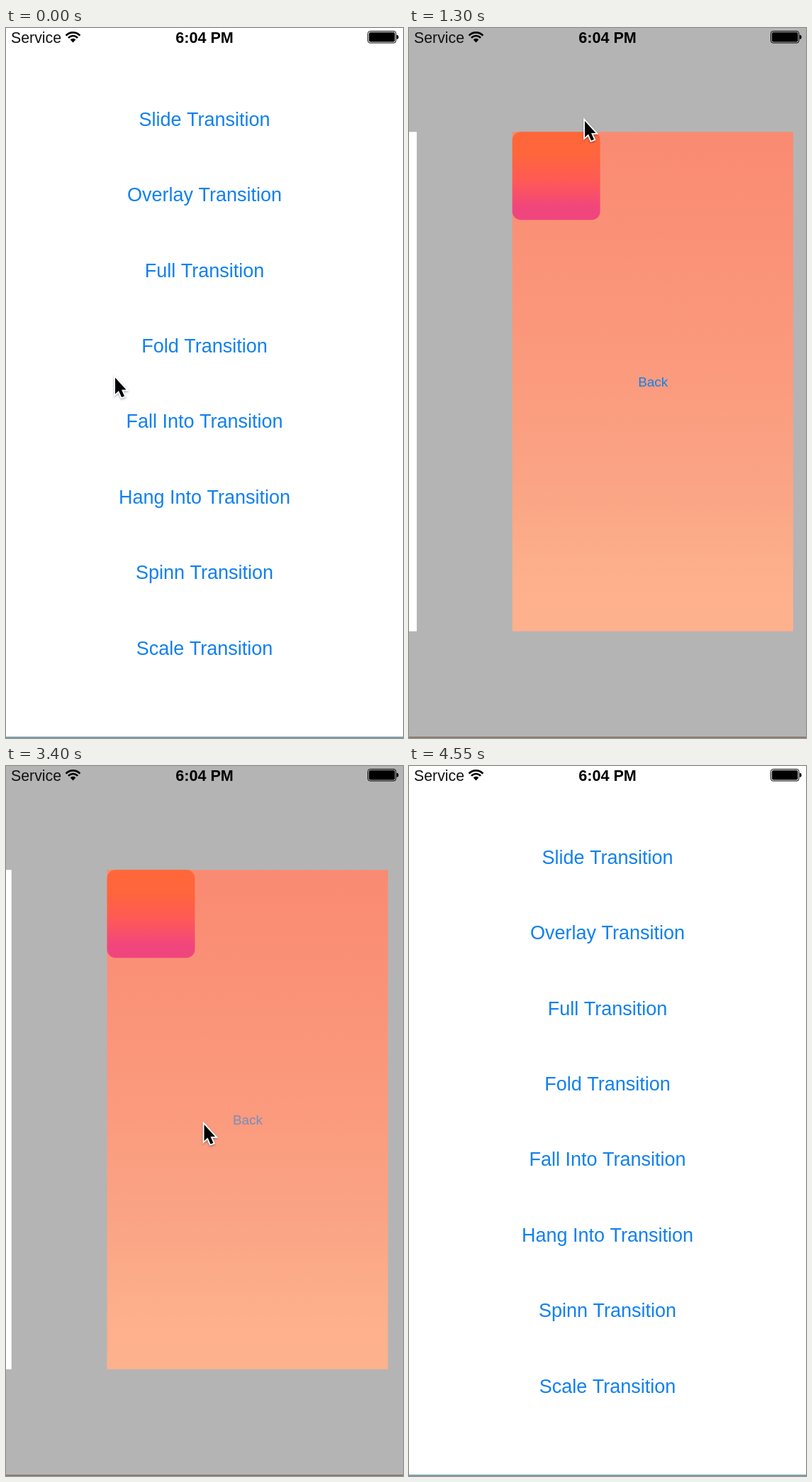
Write an HTML page with a canvas that moves like this. It is 560 by 1000 pixels and loops after 4600 ms.

```html
<!DOCTYPE html>
<html lang="en">
<head>
<meta charset="utf-8">
<title>Slide transition</title>
<style>
html, body { margin: 0; width: 100%; height: 100%; overflow: hidden; background: #fff; }
canvas { display: block; width: 560px; height: 1000px; }
</style>
</head>
<body>
<canvas id="stage" width="560" height="1000"></canvas>
<script>
const ctx = document.getElementById('stage').getContext('2d');
const LOOP = 4600, STEP = 50;
const FONT = '"Liberation Sans", Arial, sans-serif';
const BLUE = '#1180ee';

// The phone screen is slightly larger than the visible stage.
const CX = 280, CY = 498, W = 566, H = 1004.8;
const LEFT = CX - W / 2, TOP = CY - H / 2;
const SMALL = 0.7, GAP = 531;
const PUSH = { start: 688, span: 348 };
const POP = { start: 2933, span: 378 };
const LABELS = ['Slide', 'Overlay', 'Full', 'Fold', 'Fall Into', 'Hang Into', 'Spinn', 'Scale'];

// time, x, y of the pointer tip
const POINTER = [
  [0, 154, 492.5], [450, 248, 131], [1320, 248, 131], [1680, 283, 547],
  [1800, 281.5, 545], [2100, 279.5, 505], [3400, 279.5, 505],
  [3900, 280, 506], [4000, 280, 506], [4350, 420, 1030], [LOOP, 420, 1030]
];

const clamp = u => Math.min(1, Math.max(0, u));
const mix = (a, b, u) => a + (b - a) * u;

// cubic-bezier(.42, 0, .58, 1)
function ease(u) {
  if (u <= 0 || u >= 1) return clamp(u);
  let lo = 0, hi = 1;
  for (let i = 0; i < 24; i++) {
    const s = (lo + hi) / 2, r = 1 - s;
    if (1.26 * s * r * r + 1.74 * s * s * r + s * s * s < u) lo = s;
    else hi = s;
  }
  return lo * lo * (3 - 2 * lo);
}

// Three phases: shrink, slide, grow.
function pose(t) {
  const back = t >= POP.start;
  const move = back ? POP : PUSH;
  const u = (t - move.start) / move.span;
  const slide = ease(clamp(u - 1));
  return {
    scale: 1 - (1 - SMALL) * (ease(clamp(u)) - ease(clamp(u - 2))),
    slide: back ? 1 - slide : slide,
    active: u > 0 && u < 3
  };
}

function text(str, x, y, size, color, align = 'center', weight = '') {
  ctx.font = `${weight} ${size}px ${FONT}`;
  ctx.textAlign = align;
  ctx.fillStyle = color;
  ctx.fillText(str, x, y);
}

function roundRect(x, y, w, h, r) {
  ctx.beginPath();
  ctx.roundRect(x, y, w, h, r);
}

function gradient(y, h, stops) {
  const g = ctx.createLinearGradient(0, y, 0, y + h);
  stops.forEach(([at, color]) => g.addColorStop(at, color));
  return g;
}

function page(scale, dx, paint) {
  ctx.save();
  ctx.translate(CX + dx, CY);
  ctx.scale(scale, scale);
  ctx.translate(-CX, -CY);
  paint();
  ctx.restore();
}

function menu(t) {
  ctx.fillStyle = '#fff';
  ctx.fillRect(LEFT, TOP, W, H);
  LABELS.forEach((name, i) => {
    ctx.globalAlpha = i === 0 && t >= 600 && t < 2800 ? 0.36 : 1;
    text(name + ' Transition', CX, 137.8 + 106.4 * i, 27, BLUE);
  });
}

function detail(t) {
  ctx.fillStyle = gradient(TOP, H, [[0, '#f98a72'], [0.5, '#fb9b7e'], [0.7, '#faa485'], [0.9, '#fdb08b'], [1, '#fdb18c']]);
  ctx.fillRect(LEFT, TOP, W, H);
  ctx.fillStyle = gradient(TOP, 177, [[0, '#ff673a'], [0.25, '#ff663c'], [0.55, '#ff5a55'], [0.85, '#f1467c'], [1, '#ef457e']]);
  roundRect(LEFT, TOP, 177, 177, 17);
  ctx.fill();
  ctx.globalAlpha = t >= 2850 ? 0.55 : 1;
  text('Back', CX + 0.5, 508.5, 27, BLUE);
}

function statusBar() {
  text('Service', 7, 21, 21.3, '#111', 'left');
  text('6:04 PM', CX, 21, 21.6, '#000', 'center', 'bold');

  ctx.strokeStyle = ctx.fillStyle = '#000';
  const arc = (r, width) => {
    ctx.lineWidth = width;
    ctx.beginPath();
    ctx.arc(94.5, 20, r, -Math.PI * 0.76, -Math.PI * 0.24);
    ctx.stroke();
  };
  arc(13.6, 2.6);
  arc(9, 2.6);
  ctx.beginPath();
  ctx.moveTo(94.5, 20.5);
  ctx.arc(94.5, 20, 5.2, -Math.PI * 0.76, -Math.PI * 0.24);
  ctx.fill();

  ctx.lineWidth = 1;
  roundRect(510.5, 4.5, 39.5, 16.5, 3);
  ctx.stroke();
  roundRect(512, 6, 36.5, 13.5, 2);
  ctx.fill();
  roundRect(551, 9.8, 2.6, 6, [0, 2.5, 2.5, 0]);
  ctx.fill();
}

function pointer(t) {
  let i = 1;
  while (POINTER[i][0] < t) i++;
  const [t0, x0, y0] = POINTER[i - 1], [t1, x1, y1] = POINTER[i];
  const u = ease((t - t0) / (t1 - t0));
  ctx.save();
  ctx.translate(mix(x0, x1, u), mix(y0, y1, u));
  ctx.beginPath();
  [[0, 0], [0, 23], [5, 18.5], [9, 27.5], [13, 26], [9, 17], [15.5, 17]]
    .forEach(p => ctx.lineTo(...p));
  ctx.closePath();
  ctx.save();
  ctx.shadowColor = 'rgba(0, 30, 50, .35)';
  ctx.shadowBlur = 3;
  ctx.shadowOffsetY = 1.5;
  ctx.strokeStyle = '#fff';
  ctx.lineWidth = 3.6;
  ctx.stroke();
  ctx.restore();
  ctx.fillStyle = '#000';
  ctx.fill();
  ctx.restore();
}

function draw(t) {
  const { scale, slide, active } = pose(t);
  ctx.fillStyle = '#b4b4b4';
  ctx.fillRect(0, 0, 560, 1000);
  if (slide < 1) page(scale, -GAP * slide, () => menu(t));
  if (slide > 0) page(scale, GAP * (1 - slide), () => detail(t));
  statusBar();
  ctx.fillStyle = active ? '#8b7b72' : slide ? '#77797a' : '#7fa3ab';
  ctx.fillRect(0, 998, 560, 2);
  pointer(t);
}

function frame() {
  const t = performance.now() % LOOP;
  draw(Math.floor(t / STEP) * STEP);
  requestAnimationFrame(frame);
}
frame();
</script>
</body>
</html>
```
